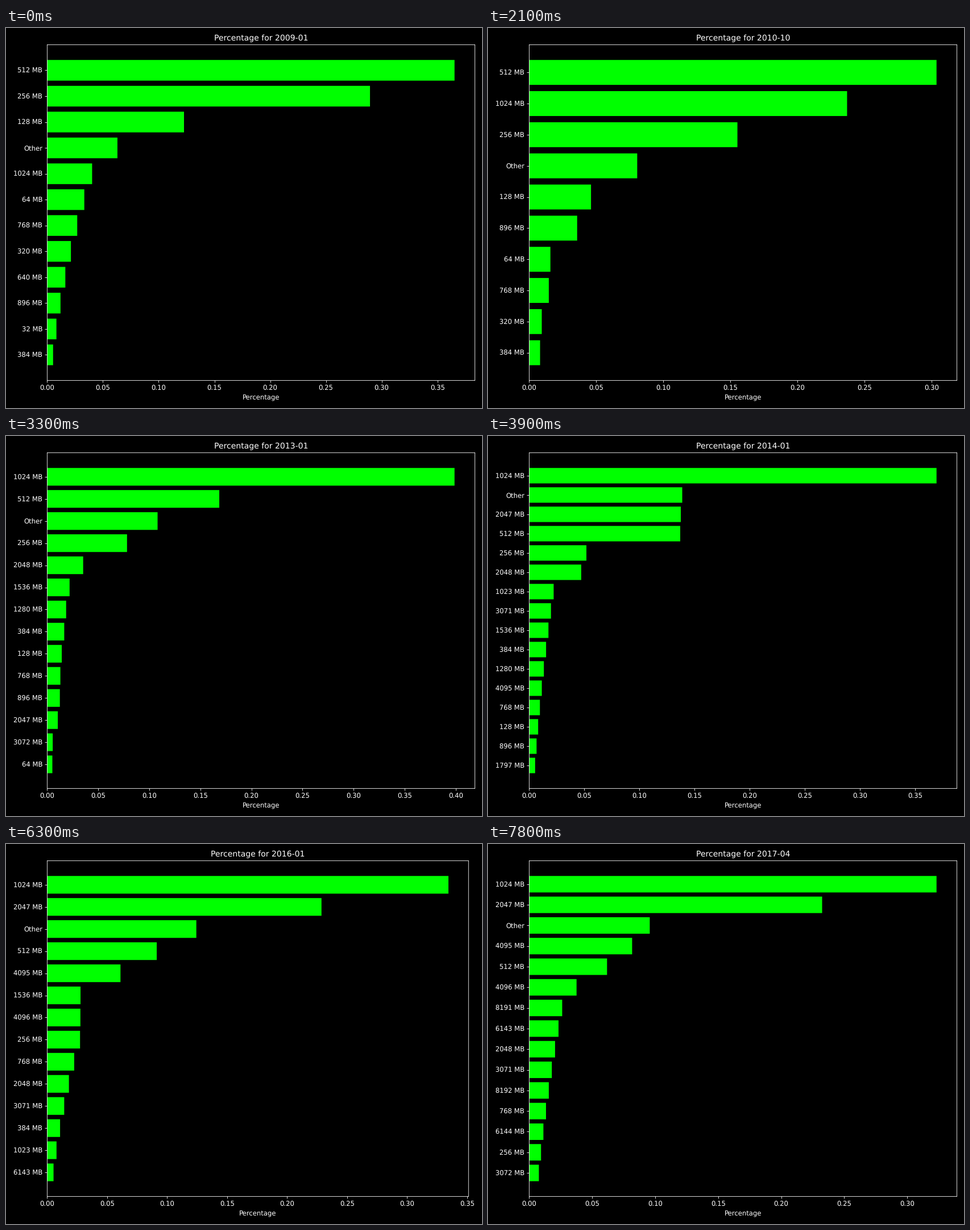
These frames come from a looping animation (837x669 px, 8000 ms). A matplotlib script:

```python
import numpy as np
import matplotlib.pyplot as plt
from matplotlib.animation import FuncAnimation

WIDTH, HEIGHT, DPI = 837, 669, 83.7
TICK_MS = 100
TICKS_PER_MONTH = 3
TOTAL_TICKS = 80
SHOWN_MIN = 0.005   # smaller shares are not listed
HIDDEN = 0.0015     # assumed share of an unlisted size

# Axes edges and half a tick label, as fractions of the stage.
LEFT, RIGHT = 72.4 / WIDTH, 824.5 / WIDTH
BOTTOM, TOP = 1 - 620.5 / HEIGHT, 1 - 29.4 / HEIGHT
HALF_LABEL = 13.6 / WIDTH
GRID = 0.05

# Ranked memory sizes, then the leading shares and the smallest share.
SURVEYS = {
    "2009-01": ("512 256 128 Other 1024 64 768 320 640 896 32 384",
                [.3653, .2895, .1227, .063, .0403, .0053]),
    "2010-01": ("512 256 1024 Other 128 896 64 768 320 640 384",
                [.3774, .1877, .1776, .0764, .0672, .0482, .0177, .0055]),
    "2012-04": ("1024 512 256 Other 2048 1536 1280 128 896 384 768 3072 64 "
                "1722 2 3 320 416 7",
                [.4224, .1968, .1063, .0896, .0283, .00502]),
    "2014-01": ("1024 Other 2047 512 256 2048 1023 3071 1536 384 1280 4095 "
                "768 128 896 1797",
                [.3694, .1388, .1375, .137, .0519, .0472, .0222, .0054]),
    "2014-10": ("1024 2047 Other 512 256 2048 3071 4095 1536 768 1023 384 "
                "1280 128 1797",
                [.3353, .2012, .1429, .1192, .0417, .031, .0053]),
    "2016-01": ("1024 2047 Other 512 4095 1536 4096 256 768 2048 3071 384 "
                "1023 6143",
                [.3344, .2286, .1243, .0913, .0611, .0278, .0277, .0274,
                 .0053]),
    "2017-04": ("1024 2047 Other 4095 512 4096 8191 6143 2048 3071 8192 768 "
                "6144 256 3072",
                [.3233, .2325, .0957, .0817, .0618, .0376, .0262, .0077]),
}

SKIPPED = {"2011-01", "2011-04", "2011-07", "2011-10",
           "2012-10", "2013-04", "2013-10"}
QUARTERS = [f"{year}-{month:02d}" for year in range(2009, 2018)
            for month in (1, 4, 7, 10)]
MONTHS = [q for q in QUARTERS if q <= "2017-04" and q not in SKIPPED]


def survey(month):
    """Share by size: leading values, then a quadratic fall to the smallest."""
    names, (*head, last) = SURVEYS[month]
    names = names.split()
    steps = len(names) - len(head) + 1
    tail = np.linspace(head[-1] ** .5, last ** .5, steps) ** 2
    return dict(zip(names, [*head, *tail[1:]]))


def shares_for(month):
    """Listed shares of a month, smallest first."""
    before = max(key for key in SURVEYS if key <= month)
    after = min(key for key in SURVEYS if key >= month)
    start, end = survey(before), survey(after)
    first, now, last = map(QUARTERS.index, (before, month, after))
    t = (now - first) / max(last - first, 1)
    shares = {}
    for name in [*start, *(n for n in end if n not in start)]:
        a, b = start.get(name, HIDDEN), end.get(name, HIDDEN)
        shares[name] = a ** (1 - t) * b ** t
    listed = [item for item in shares.items() if item[1] >= SHOWN_MIN]
    return sorted(listed, key=lambda item: item[1])


plt.style.use("dark_background")
plt.rcParams.update({
    "font.family": "DejaVu Sans",
    "text.hinting": "no_hinting",
    "path.snap": False,
    "axes.linewidth": 0.72,
    "xtick.major.width": 0.72,
    "ytick.major.width": 0.72,
})
fig, ax = plt.subplots(
    figsize=((WIDTH + .01) / DPI, (HEIGHT + .01) / DPI), dpi=DPI)
shown = None


def draw_month(month):
    names, values = zip(*shares_for(month))
    labels = [n if n == "Other" else f"{n} MB" for n in names]
    ax.clear()
    ax.barh(labels, values, color="#00ff00")
    ax.set_title(f"Percentage for {month}")
    ax.set_xlabel("Percentage")
    # Narrow the axes when the last tick label would pass the right margin.
    limit = 1.05 * max(values)
    ax.set_xlim(0, limit)
    last_tick = limit // GRID * GRID
    room = (RIGHT - HALF_LABEL - LEFT) * limit / last_tick
    fig.subplots_adjust(left=LEFT, right=min(RIGHT, LEFT + room),
                        bottom=BOTTOM, top=TOP)


def update(tick):
    global shown
    month = MONTHS[tick // TICKS_PER_MONTH]
    if month != shown:
        draw_month(month)
        shown = month
    return []


anim = FuncAnimation(fig, update, frames=TOTAL_TICKS, interval=TICK_MS,
                     init_func=lambda: update(0), repeat=True,
                     repeat_delay=0)
plt.show()
```
